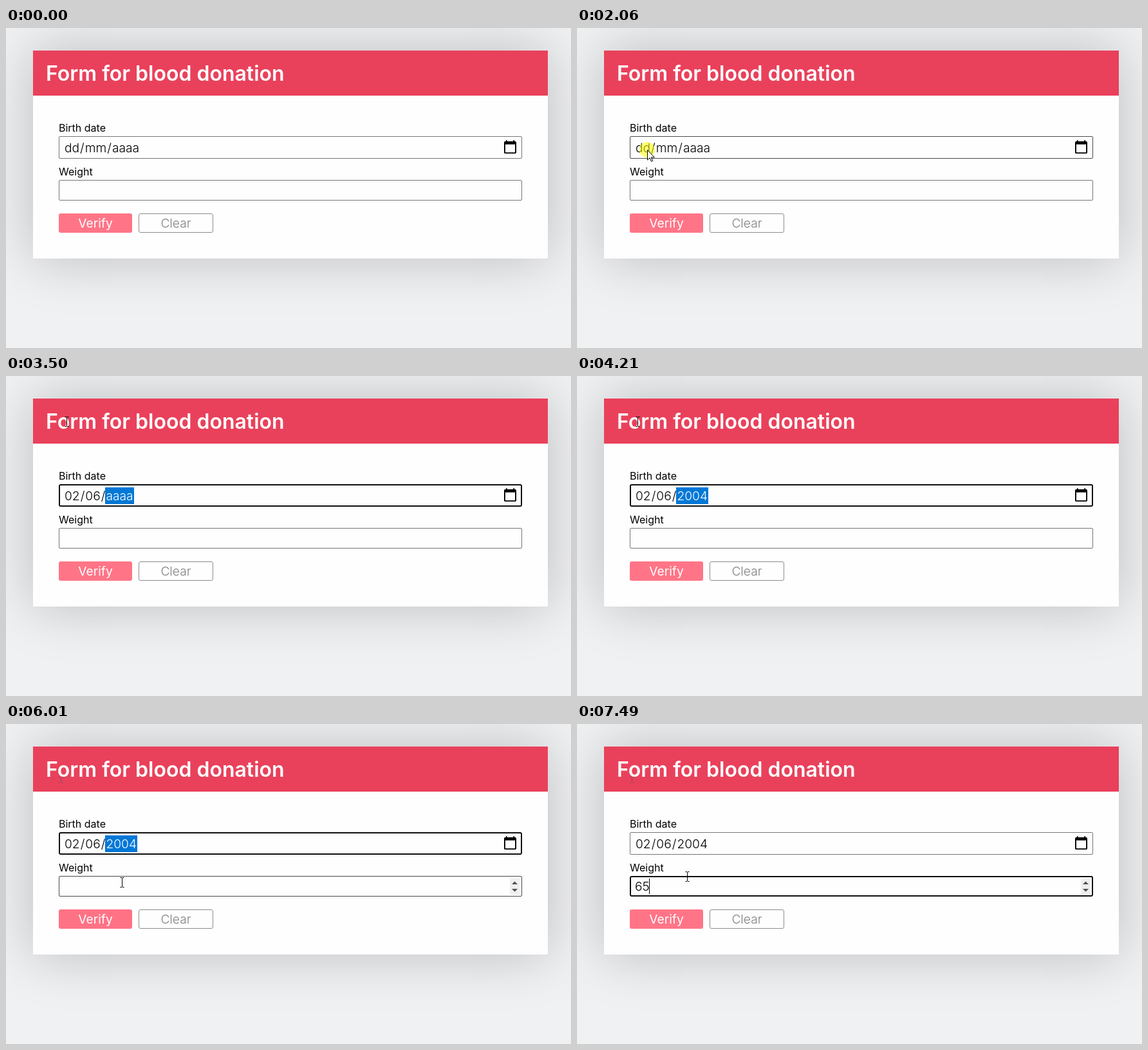
Recreate the animation shown at these times as an HTML page. Size 878x497 px, loop 8 s.

```html
<!DOCTYPE html>
<html lang="en">
<head>
<meta charset="utf-8">
<title>Form for blood donation</title>
<style>
  html, body { margin: 0; width: 100%; height: 100%; overflow: hidden; background: #f0f1f3; }
  body { position: relative; font: 300 19.2px Inter, sans-serif; font-optical-sizing: none; color: #000; }
  body > * { position: absolute; box-sizing: border-box; margin: 0; white-space: pre; }
  #card { left: 42px; top: 35px; width: 800px; height: 323px; background: #fefefe; box-shadow: 0 0 80px rgba(0, 0, 0, .22); }
  h1 { left: 42px; top: 35px; width: 800px; height: 70px; padding-left: 20px; background: #e9415b; color: #fff; font-size: 32px; font-weight: 600; line-height: 72px; }
  label { left: 82px; font-size: 16px; font-weight: 400; line-height: 20px; }
  .field { left: 82px; width: 720px; border: 1px solid #767676; border-radius: 2px; }
  .field.hover { border-color: #4a4a4a; }
  .field.focus { border: 2px solid #101010; border-radius: 3px; }
  .value { left: 90px; line-height: 34px; }
  #date span { padding: 1px; }
  #date .selected { background: #0078d7; color: #fff; }
  .button { top: 288px; height: 30px; line-height: 30px; border-radius: 3px; text-align: center; }
  #verify { left: 82px; width: 114px; color: #fff; font-weight: 400; }
  #clear { left: 206px; width: 116px; line-height: 28px; border: 1px solid #8d8d8d; color: #808080; }
  svg { left: 0; top: 0; }
</style>
</head>
<body>
<div id="card"></div>
<h1>Form for blood donation</h1>
<label style="top:145px">Birth date</label>
<div class="field" id="dateField" style="top:168px;height:35px"></div>
<div class="value" id="date" style="top:169px"><span></span>/<span></span>/<span></span></div>
<label style="top:213px">Weight</label>
<div class="field" id="weightField" style="top:236px;height:32px"></div>
<div class="value" id="weight" style="top:235px"></div>
<div class="button" id="verify">Verify</div>
<div class="button" id="clear">Clear</div>
<svg width="878" height="497" viewBox="0 0 878 497">
  <path transform="translate(772.1 173.2) scale(.95)" d="M20 3h-1V1h-2v2H7V1H5v2H4c-1.1 0-2 .9-2 2v16c0 1.1.9 2 2 2h16c1.1 0 2-.9 2-2V5c0-1.1-.9-2-2-2zm0 18H4V8h16z"/>
  <g id="spinner">
    <path fill="#efefef" d="M783 240h15v25h-15z"/>
    <path fill="#505050" d="M786 249l4.500-4.500 4.500 4.500zM786 256h9l-4.500 4.500z"/>
  </g>
  <path id="caret" d="M0 240h1v24h-1z"/>
  <path id="trail" fill="none" stroke="#7d4a55" opacity=".8" d="M82 82.500h2M87 82.500h2M85.500 83v8M82 91.500h2M87 91.500h2"/>
  <circle id="click" r="12" fill="#ff0" fill-opacity=".55"/>
  <path id="arrow" fill="#fff" stroke="#000" d="M.5 .5V16L4 12.700 6.500 18.300 8.700 17.300 6.300 11.900H11.300Z"/>
  <path id="beam" fill="none" stroke="#000" d="M-3-7.500h2.500M.5-7.500h2.500M0-7v14M-3 7.500h2.500M.5 7.500h2.500"/>
</svg>
<script>
const LOOP = 8000;
const DATE_FOCUS = 2120, WEIGHT_FOCUS = 6680;
const CLICKS = [2080, 6575];
const DATE_KEYS = [2890, 3040, 3190, 3500, 3660, 3900, 4050, 4210];
const WEIGHT_KEYS = [7420, 7490];

const $ = id => document.getElementById(id);
const dateParts = [...document.querySelectorAll('#date span')];
const easeIn = power => p => p ** power;
const easeOut = power => p => 1 - (1 - p) ** power;

// The pointer follows a curve per move, advancing in even steps as captured on screen.
const moves = [
  { start: 820, end: 1590, steps: 10, from: [252, 484], to: [110, 188], ease: easeOut(1.85) },
  { start: 1650, end: 2360, steps: 9, from: [109, 190], to: [94.5, 71.5], ease: easeIn(8) },
  { start: 5060, end: 5850, steps: 10, from: [94.5, 71.5], bend: [60, 120], to: [187, 234], ease: p => p },
  { start: 5930, end: 6710, steps: 10, from: [187, 240], bend: [167, 262], to: [171, 237], ease: easeOut(2) },
];

function pointerAt(t) {
  const { start, end, steps, from, to, bend, ease } = moves.findLast(move => t >= move.start) || moves[0];
  const step = Math.floor((t - start + 15) / (end - start) * steps);
  const u = ease(Math.max(0, Math.min(1, step / steps)));
  return from.map((a, i) => {
    const b = bend ? bend[i] : (a + to[i]) / 2;
    return (1 - u) ** 2 * a + 2 * u * (1 - u) * b + u * u * to[i];
  });
}

const pressed = (keys, t) => keys.filter(time => time <= t).length;

// Each date part keeps its placeholder until typed, then pads with zeros.
function showDate(t) {
  const count = pressed(DATE_KEYS, t);
  const typed = '02062004'.slice(0, count);
  const focused = t >= DATE_FOCUS && t < WEIGHT_FOCUS;
  const selected = count < 2 ? 0 : count < 4 ? 1 : 2;
  ['dd', 'mm', 'aaaa'].forEach((placeholder, i) => {
    const size = placeholder.length;
    const digits = typed.slice(i * 2, i * 2 + size);
    dateParts[i].textContent = digits ? digits.padStart(size, '0') : placeholder;
    dateParts[i].className = focused && i === selected ? 'selected' : '';
  });
}

function showWeight(t) {
  const count = pressed(WEIGHT_KEYS, t);
  $('weight').textContent = '65'.slice(0, count);
  const blinkStart = count ? WEIGHT_KEYS[count - 1] : WEIGHT_FOCUS;
  show('caret', t >= WEIGHT_FOCUS && (t - blinkStart) % 1000 < 500);
  place('caret', 90 + Math.floor($('weight').getBoundingClientRect().width), 0);
}

const show = (id, visible) => $(id).style.display = visible ? '' : 'none';
const place = (id, x, y) => $(id).setAttribute('transform', `translate(${x} ${y})`);

function setField(id, focused, hovered) {
  $(id).className = 'field' + (focused ? ' focus' : hovered ? ' hover' : '');
}

function render(t) {
  const [x, y] = pointerAt(t);
  const visible = t >= moves[0].start;
  const overDate = visible && y >= 168 && y < 203;
  const overWeight = visible && y >= 236 && y < 268;
  const useBeam = overWeight || y < 92;

  setField('dateField', t >= DATE_FOCUS && t < WEIGHT_FOCUS, overDate);
  setField('weightField', t >= WEIGHT_FOCUS, overWeight);
  showDate(t);
  showWeight(t);

  const glow = visible ? Math.max(0, 1 - Math.abs(y - 303) / 66) : 0;
  $('verify').style.background = `rgb(255, ${117 - 21 * glow}, ${135 - 14 * glow})`;

  show('spinner', overWeight);
  show('trail', t >= 5200);
  show('click', CLICKS.some(time => Math.abs(t - time) < 110));
  place('click', x, y);
  show('arrow', visible && !useBeam);
  place('arrow', Math.round(x), Math.round(y));
  show('beam', visible && useBeam);
  place('beam', Math.floor(x) + .5, Math.floor(y));
}

function frame(now) {
  render(now % LOOP);
  requestAnimationFrame(frame);
}
render(0);
requestAnimationFrame(frame);
</script>
</body>
</html>
```
